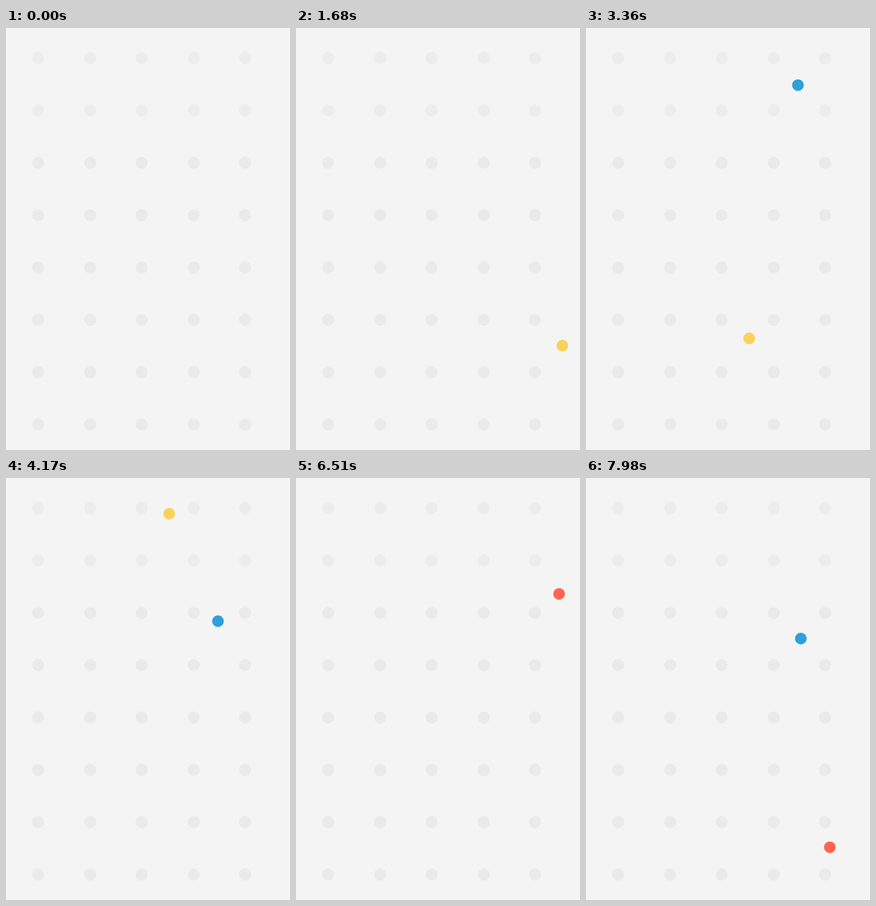
An HTML page that plays this animation: 615x910 px, repeating every 8 s.

```html
<!DOCTYPE html>
<html lang="en">
<head>
<meta charset="utf-8">
<title>Moving dots</title>
<style>
  html, body { margin: 0; width: 100%; height: 100%; overflow: hidden; background: #f4f4f4; }
  svg { display: block; width: 615px; height: 910px; }
</style>
</head>
<body>
<svg id="stage" viewBox="0 0 615 910"></svg>
<script>
const LOOP = 8000, STEP = 30;
const stage = document.getElementById('stage');

function circle(cx, cy, r, fill) {
  const el = document.createElementNS('http://www.w3.org/2000/svg', 'circle');
  Object.entries({ cx, cy, r, fill }).forEach(([k, v]) => el.setAttribute(k, v));
  return stage.appendChild(el);
}

for (let row = 0; row < 8; row++) {
  for (let col = 0; col < 5; col++) {
    circle(69.6 + col * 112 + (col % 2) * 0.9, 65 + row * 112.86, 13, row < 2 ? '#ececec' : '#eaeaea');
  }
}

// Each leg moves one axis: [axis, start ms, duration ms, destination]
const dots = [
  { color: '#fad25a', from: { x: 577.4, y: 975 }, legs: [
    ['y', 131, 1523, 685],
    ['x', 1610, 900, 353.4],
    ['y', 2931, 2200, -78]
  ] },
  { color: '#2ca1da', from: { x: 683, y: 122.2 }, legs: [
    ['x', 1470, 1700, 459],
    ['y', 3197, 1668, 346.2],
    ['x', 4817, 1350, 683],
    ['x', 6482, 1925, 459]
  ] },
  { color: '#ff664d', from: { x: 569.7, y: -78 }, legs: [
    ['y', 5680, 1710, 796.2],
    ['x', 7552, 1000, 345.7]
  ] }
];
dots.forEach(dot => { dot.el = circle(dot.from.x, dot.from.y, 12.5, dot.color); });

// cubic-bezier(.9, 0, .1, 1), solved by bisection
function ease(p) {
  if (p <= 0) return 0;
  if (p >= 1) return 1;
  let lo = 0, hi = 1;
  for (let i = 0; i < 24; i++) {
    const s = (lo + hi) / 2, r = 1 - s;
    if (2.7 * s * r * r + 0.3 * s * s * r + s ** 3 < p) lo = s; else hi = s;
  }
  return lo * lo * (3 - 2 * lo);
}

function draw(time) {
  for (const { el, from, legs } of dots) {
    const pos = { ...from };
    for (const [axis, start, duration, to] of legs) {
      pos[axis] += (to - pos[axis]) * ease((time - start) / duration);
    }
    el.setAttribute('cx', pos.x);
    el.setAttribute('cy', pos.y);
  }
}

const begin = performance.now();
function tick() {
  const time = (performance.now() - begin) % LOOP;
  draw(Math.floor(time / STEP) * STEP);
  requestAnimationFrame(tick);
}
tick();
</script>
</body>
</html>
```
